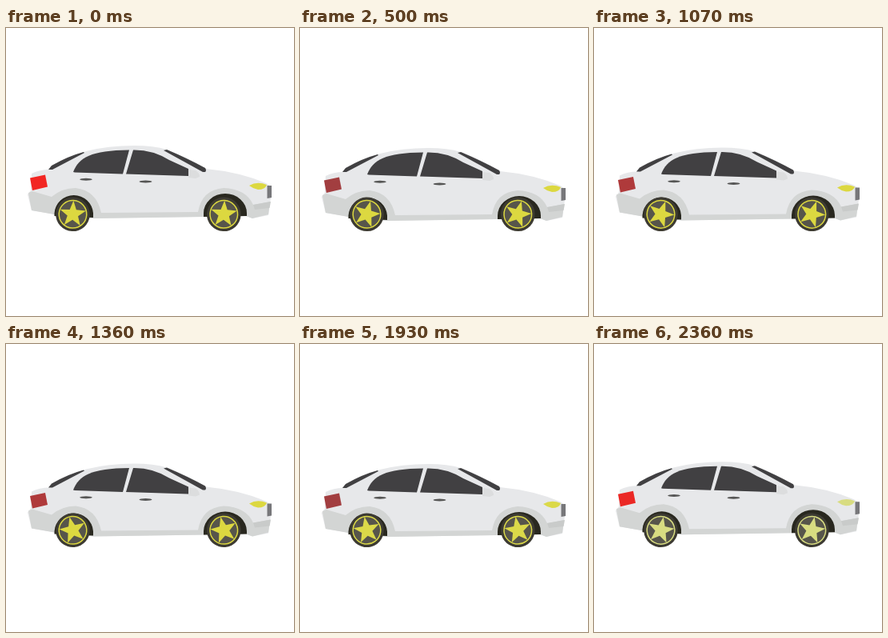
Animation of 360x360 px, one loop 2430 ms. Source, as an HTML page:

```html
<!DOCTYPE html>
<html lang="en">
<head>
<meta charset="utf-8">
<title>Car</title>
<style>
html, body { margin: 0; width: 100%; height: 100%; overflow: hidden; background: #fff; }
svg { display: block; width: 100%; height: 100%; }
</style>
</head>
<body>
<svg viewBox="0 0 360 360">
  <defs>
    <g id="wheel">
      <circle r="21.3" fill="#3d3b33"/>
      <circle r="17.3" fill="#57554b" stroke="var(--lamp)" stroke-width="1.5"/>
      <path id="star" fill="var(--lamp)"/>
    </g>
  </defs>
  <g id="body">
    <path fill="#e7e8ea" d="M32 182Q42 177 54 177Q76 161 100 154Q128 147 160 147Q185 147 201 152Q227 162 250 176Q292 180 325 194L331 198V212L328 234L308 238L300 235L247 236L110 238L62 233L32 228L27 208L31 203Z"/>
    <path fill="#d3d5d4" d="M28 206L33 204L57 211Q70 200 87 200Q113 203 119 231L240 230Q245 202 272 200Q300 201 309 221L330 217L328 233L308 238L300 235L247 236L110 238L60 233L32 228Z"/>
    <path fill="#c9cbca" d="M309 221L331 217L329.500 225L311 227Z"/>
    <path fill="#29281f" d="M60.500 235V231.500A24.300 24 0 0 1 109 231.500V237ZM247 236V231.500A27 24.500 0 0 1 301 231.500V235Z"/>
    <g fill="#414042">
      <path d="M53 177L57 172Q78 160 97 155L98 156L58 177Z"/>
      <path d="M84 180C91 162 106 153 154 152.500L146 182.500L86 180.500Z"/>
      <path d="M159 152.500Q183 152 204 165L228 176V185L150 182.500Z"/>
      <path d="M197 153L201 152Q227 163 249 175Q251 178 249 180L246 180Z"/>
    </g>
    <path fill="#dcddde" d="M228 177L237 178Q242 181 242 186L237 188L228 187Z"/>
    <g fill="#565655">
      <ellipse cx="100" cy="189.200" rx="7.800" ry="1.500"/>
      <ellipse cx="174.500" cy="192" rx="8" ry="1.500"/>
    </g>
    <path fill="var(--lamp)" d="M304 197Q314 191 326 196Q324 202 315 202Q309 201 304 197Z"/>
    <path fill="#77777a" d="M326.500 197H332V212L326.500 213Z"/>
    <path id="tail" d="M30 187.500L49 183.500L52 198.500L33 203Z"/>
  </g>
  <g transform="translate(83.500 232.800)"><use class="spin" href="#wheel"/></g>
  <g transform="translate(272.300 232.800)"><use class="spin" href="#wheel"/></g>
</svg>
<script>
const LOOP = 2430, STEPS = 34, BOUNCES = 3, TURNS = 6;
const LEAD = 6; // ms, so steps begin on the rounded 10 ms ticks
const byId = id => document.getElementById(id);
const mix = (a, b, k) => `rgb(${a.map((v, i) => Math.round(v + (b[i] - v) * k))})`;
const wheels = document.querySelectorAll('.spin');

const corners = Array.from({ length: 10 }, (_, i) => {
  const r = i % 2 ? 7 : 17, a = i * Math.PI / 5;
  return [r * Math.sin(a), -r * Math.cos(a)].map(v => v.toFixed(2));
});
byId('star').setAttribute('d', 'M' + corners.join('L') + 'Z');

function draw(now) {
  const step = Math.floor((now + LEAD) % LOOP / LOOP * STEPS);
  const turn = step / STEPS;
  const drop = (1 - Math.cos(turn * BOUNCES * 2 * Math.PI)) / 2;
  const pale = turn > 0.64 ? 1 - drop : 0;

  byId('body').setAttribute('transform', `translate(0 ${(drop * 3.5).toFixed(2)})`);
  wheels.forEach(w => w.setAttribute('transform', `rotate(${3 + turn * TURNS * 360})`));
  byId('tail').setAttribute('fill', mix([242, 38, 34], [150, 66, 68], drop));
  document.documentElement.style.setProperty('--lamp', mix([220, 216, 64], [216, 220, 134], pale));
  requestAnimationFrame(draw);
}
requestAnimationFrame(draw);
</script>
</body>
</html>
```
